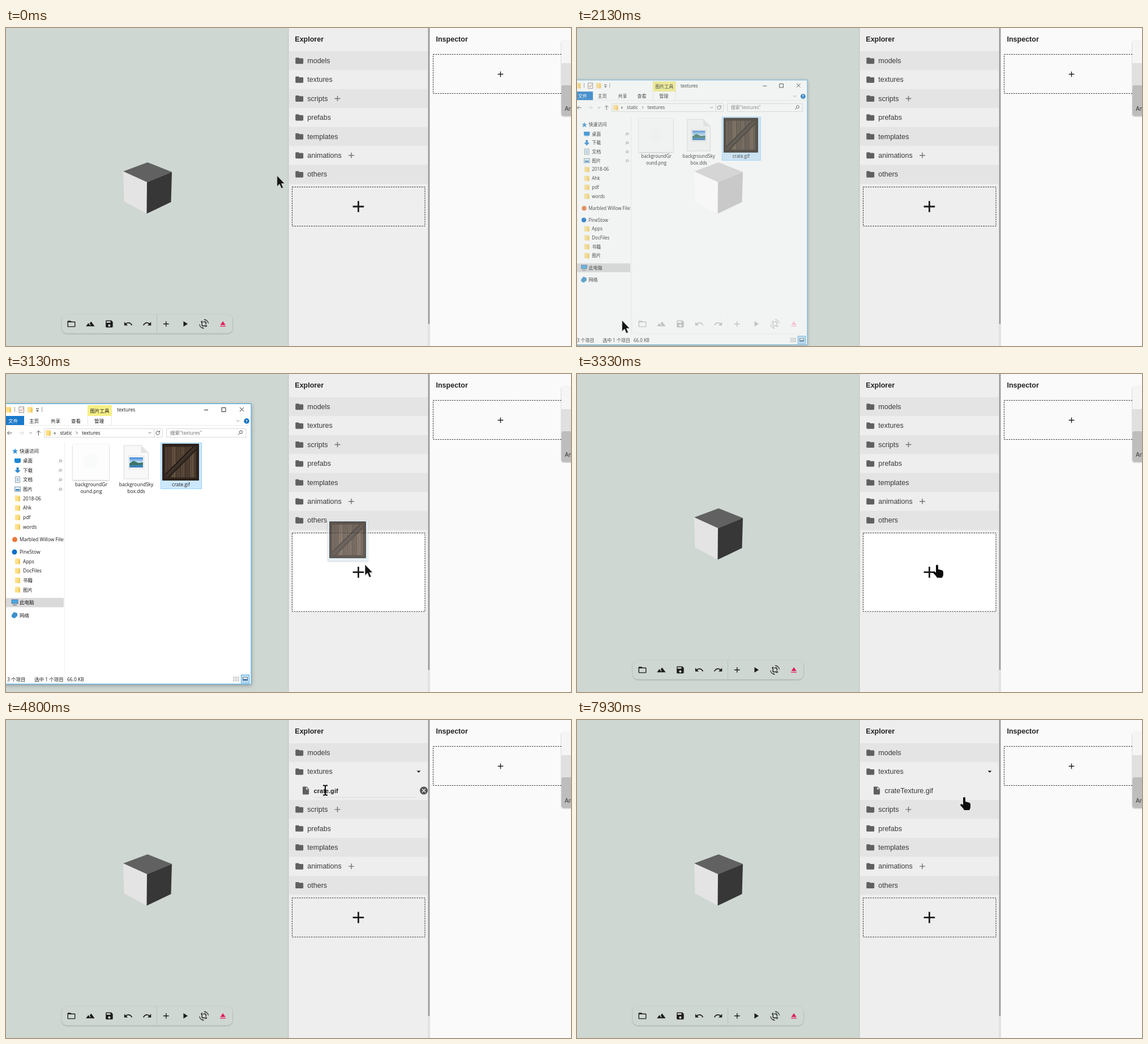
An HTML page for the animation above (8 s loop, 998x561 px).

```html
<!DOCTYPE html>
<html lang="en">
<head>
<meta charset="utf-8">
<title>Asset explorer</title>
<style>
html, body { margin: 0; width: 100%; height: 100%; overflow: hidden; background: #ced7d2; }
svg { display: block; width: 100vw; height: 100vh; }
text { white-space: pre; }
.app { font: 12.5px "Liberation Sans", Arial, sans-serif; fill: #383838; }
.bold { font-weight: bold; fill: #212121; }
.win { font: 8.5px "Open Sans", "Noto Sans CJK SC", "Noto Sans CJK", sans-serif; fill: #1a1a1a; }
.mid { text-anchor: middle; }
.dash { stroke: #303030; stroke-dasharray: 2.5 1.65; }
.thin { fill: none; stroke: #555; stroke-width: 1; }
</style>
</head>
<body>
<svg id="stage" viewBox="0 0 998 561" preserveAspectRatio="none"></svg>
<script>
const ICONS = {
  folder: 'M10 4H4c-1.1 0-2 .9-2 2v12c0 1.1.9 2 2 2h16c1.1 0 2-.9 2-2V8c0-1.1-.9-2-2-2h-8z',
  open: 'M20 6h-8l-2-2H4c-1.1 0-2 .9-2 2v12c0 1.1.9 2 2 2h16c1.1 0 2-.9 2-2V8c0-1.1-.9-2-2-2zm0 12H4V8h16z',
  terrain: 'M14 6l-3.75 5 2.85 3.8-1.6 1.2C9.8 13.75 7 10 7 10l-6 8h22z',
  save: 'M17 3H5c-1.1 0-2 .9-2 2v14c0 1.1.9 2 2 2h14c1.1 0 2-.9 2-2V7zm-5 16c-1.66 0-3-1.34-3-3s1.34-3 3-3 3 1.34 3 3-1.34 3-3 3zm3-10H5V5h10z',
  undo: 'M12.5 8c-2.65 0-5.05 1-6.9 2.6L2 7v9h9l-3.6-3.6c1.4-1.2 3.1-1.9 5.1-1.9 3.5 0 6.5 2.3 7.6 5.5l2.4-.8C21.1 11 17.1 8 12.5 8z',
  redo: 'M18.4 10.6C16.5 9 14.1 8 11.5 8c-4.6 0-8.6 3-10 7.2l2.4.8c1.1-3.2 4.1-5.5 7.6-5.5 2 0 3.7.7 5.1 1.9L13 16h9V7z',
  add: 'M19 13h-6v6h-2v-6H5v-2h6V5h2v6h6z',
  play: 'M8 5v14l11-7z',
  crop: 'M7.5 21.5C4.2 19.9 1.9 16.8 1.5 13H0c.5 6.2 5.7 11 12 11h.6l-3.8-3.8zM12 0h-.6l3.8 3.8 1.3-1.3C19.8 4.1 22.1 7.2 22.5 11H24C23.5 4.8 18.3 0 12 0zM16 14h2V8c0-1.1-.9-2-2-2h-6v2h6zm-8 2V4H6v2H4v2h2v8c0 1.1.9 2 2 2h8v2h2v-2h2v-2z',
  eject: 'M5 17h14v2H5zm7-12L5.3 15h13.4z',
  file: 'M6 2c-1.1 0-2 .9-2 2v16c0 1.1.9 2 2 2h12c1.1 0 2-.9 2-2V8l-6-6zm7 7V3.5L18.5 9z',
  cancel: 'M12 2a10 10 0 1 0 0 20 10 10 0 0 0 0-20zm5 13.6L15.6 17 12 13.4 8.4 17 7 15.6l3.6-3.6L7 8.4 8.4 7l3.6 3.6L15.6 7 17 8.4 13.4 12z',
  caret: 'M7 10l5 5 5-5z'
};
const ROW = 33.4;

const icon = (name, x, y, fill = '#606060', k = .695) =>
  `<path transform="translate(${x} ${y}) scale(${k}) translate(-12 -12)" fill="${fill}" d="${ICONS[name]}"/>`;
const rect = (x, y, w, h, fill, extra = '') =>
  `<rect x="${x}" y="${y}" width="${w}" height="${h}" fill="${fill}" ${extra}/>`;
const text = (x, y, s, cls = '', extra = '') => `<text x="${x}" y="${y}" class="${cls}" ${extra}>${s}</text>`;
const line = (d, color = '#555', extra = '') => `<path d="${d}" class="thin" style="stroke:${color}" ${extra}/>`;
const poly = (points, fill) => `<polygon points="${points}" fill="${fill}"/>`;
const dot = (x, y, r, fill) => `<circle cx="${x}" cy="${y}" r="${r}" fill="${fill}"/>`;

function row(i, name, add) {
  const top = 41 + i * ROW, mid = top + ROW / 2;
  return rect(500, top, 245, ROW, i % 2 ? '#eee' : '#e4e4e4') + icon('folder', 518.2, mid)
    + text(532.3, mid + 4.3, name) + (add ? icon('add', add, mid, '#707070') : '');
}

function scene() {
  const tools = ['open', 'terrain', 'save', 'undo', 'redo', 'add', 'play', 'crop', 'eject'];
  return rect(0, 0, 998, 561, '#ced7d2')
    + poly('250,237 293,254 249,272 207,253', '#616161')
    + poly('207,253 249,272 248.5,327.5 208.5,306', '#e4e4e4')
    + poly('293,254 249,272 248.5,327.5 291.5,307', '#373737')
    + rect(98.5, 505.5, 301.5, 33, '#cfd7d3', 'rx="9" filter="url(#soft)"')
    + line('M266.5 505V539', '#bac2be')
    + tools.map((n, i) => icon(n, 115.5 + i * 33.45, 522, n === 'eject' ? '#e01f5a' : '#1c1c1c')).join('');
}

function panels() {
  return '<g class="app">' + rect(499.5, -5, 246, 571, '#eee', 'filter="url(#soft)"')
    + text(510.3, 24.3, 'Explorer', 'bold') + row(0, 'models') + row(1, 'textures')
    + `<g id="file">${icon('caret', 729, 91, '#212121')}
      <g id="entry">${icon('file', 529.5, 124.5)}<text id="name" x="543.5" y="128.8"></text>
      <g id="edit"><path id="rule" d="M544 136.5H722" fill="none"/>${icon('cancel', 738, 124.5, '#555')}</g></g></g>`
    + '<g id="lower">' + row(2, 'scripts', 585.5) + row(3, 'prefabs') + row(4, 'templates')
    + row(5, 'animations', 610) + row(6, 'others')
    + '<rect id="drop" class="dash" x="505.5" y="280.5" width="234.5"/><g id="plus">'
    + icon('add', 622.4, 315, '#1c1c1c', 1.4) + '</g></g>'
    + rect(745, 0, 4, 561, '#e2e2e2') + rect(745.7, 0, 2.5, 522, '#999')
    + rect(749, 0, 249, 561, '#fafafa') + text(759.5, 24.3, 'Inspector', 'bold')
    + rect(754.5, 46.5, 238.5, 69, 'none', 'class="dash"') + icon('add', 873.5, 81.5, '#1c1c1c')
    + rect(981, 22, 30, 133, '#f5f5f5', 'rx="4" filter="url(#soft)"')
    + rect(981, 62, 30, 45, '#e0e0e0') + rect(981, 101, 30, 54, '#bdbdbd', 'rx="4"')
    + text(987, 145.5, 'Animation', '', 'font-size="10"') + '</g>';
}

const folderIcon = (x, y) => rect(x, y - 5, 9, 10, '#ffe08a', 'rx=".8"') + rect(x + 6, y - 3, 3, 8, '#f3c95f');

function sidebar() {
  const pinned = ['桌面', '下载', '文档', '图片'].map((s, i) => {
    const y = 153 + i * 16.7;
    const art = [
      rect(15, y - 4, 11, 7, '#1d86d6') + rect(17, y + 3, 7, 1, '#1d86d6'),
      poly(`18.5,${y - 5} 22.5,${y - 5} 22.5,${y} 26,${y} 20.5,${y + 5} 15,${y} 18.5,${y}`, '#2a86d1'),
      rect(16.5, y - 5, 8, 10, '#fff', 'stroke="#7c95a8"') + line(`M18.5 ${y - 2}h4m-4 2h4m-4 2h4`, '#5a93c4'),
      rect(15.5, y - 4, 10, 8, '#dff0fa', 'stroke="#7c95a8"') + rect(17, y, 7, 2.5, '#2d7dbb')
    ][i];
    return art + text(30, y + 3, s) + line(`M93 ${y + 3}l2.5-2.5m-2-2l4 4m-3-3l2-2 2.5 2.5-2 2`, '#8a8a8a');
  }).join('');
  const folder = (s, y) => folderIcon(16, y) + text(30, y + 3, s);
  const recent = ['2018-06', 'Ahk', 'pdf', 'words'].map((s, i) => folder(s, 219.5 + i * 16.7)).join('');
  const cloud = ['Apps', 'DocFiles', '书籍', '图片'].map((s, i) => folder(s, 330.5 + i * 16.7)).join('');
  return '<g clip-path="url(#side)">' + rect(-8, 395, 110, 16.5, '#d9d9d9')
    + poly('16,131 17.3,134.5 21,134.7 18.2,137 19.2,141 16,138.8 12.8,141 13.8,137 11,134.7 14.7,134.5', '#3791d6')
    + text(24, 139, '快速访问') + recent + dot(15.5, 292, 4.5, '#e8783c') + text(24, 295, 'Marbled Willow Files')
    + dot(15, 314, 4.5, '#0f6fc6') + text(24, 317, 'PineStow') + cloud
    + rect(10, 398, 11, 7, '#49a9e2', 'stroke="#447"  stroke-width=".6"') + rect(12, 407, 7, 1.2, '#567')
    + text(24, 406, '此电脑') + poly('10,425 14,420 20,422 20,427 15,431 10,429', '#3d8fc9') + text(24, 428.5, '网络')
    + '</g>' + pinned + line('M103.5 120V528', '#efefef');
}

function explorerWindow() {
  const ribbon = [[41, '主页'], [79, '共享'], [115, '查看'], [156, '管理']];
  return rect(-10, 52.5, 443, 494.5, '#fff', 'stroke="#3d9edb" filter="url(#shade)"')
    + folderIcon(0, 63) + line('M15.5 58v9M63.5 58v9', '#999')
    + rect(23, 58, 8.5, 10, '#fff', 'stroke="#888"') + line('M24.5 63l2 2.5 4-5', '#d2603a') + folderIcon(38, 63)
    + line('M53 61.5h5', '#333') + poly('53,64 58,64 55.5,66.5', '#333')
    + rect(144, 55, 43, 19, '#f5ef86') + text(148.5, 67.5, '图片工具') + line('M144.5 74V90M186.5 74V90', '#e6e6e6')
    + text(196, 66, 'textures') + line('M350 63.5h7M381 59.5h7v7h-7zM413 59l7 7m0-7l-7 7', '#222')
    + rect(-9, 74, 41, 16, '#1979ca') + text(4, 85.5, '文件', '', 'style="fill:#fff"')
    + ribbon.map(([x, s]) => text(x, 85.5, s)).join('') + line('M407 81.5l2.5 2.5 2.5-2.5', '#888')
    + dot(425, 83, 4.7, '#1070c0') + text(425, 86, '?', 'mid', 'style="fill:#fff;font-weight:bold;font-size:7.5px"')
    + line('M0 90.5H433', '#ebebeb')
    + line('M10.5 104H2.5m3.5-3.5L2.5 104l3.5 3.5M57.5 108.500v-8.500m-3.500 3.500l3.500-3.500 3.500 3.500')
    + line('M23 104h8m-3.500-3.500l3.500 3.500-3.500 3.500', '#d0d0d0')
    + line('M41.500 103l2 2 2-2M251.500 102.500l2.500 2.500 2.500-2.500', '#777')
    + line('M67.500 96.500h208.500v15h-208.500zM262 97v14M283.500 96.500h140.500v15h-140.500z', '#d9d9d9')
    + folderIcon(70, 104) + text(84, 107, '«') + text(95.5, 107, 'static') + line('M124 101.500l2.200 2.300-2.200 2.300')
    + text(134, 107, 'textures') + line('M270.500 101.500a3.300 3.300 0 1 0 1 2.500m0-4v2.500h-2.500')
    + text(290, 107, '搜索"textures"', '', 'style="fill:#6d6d6d"') + dot(415, 102.5, 2.6, 'none" stroke="#444')
    + line('M413 104.5l-3 3', '#444') + sidebar()
    + rect(118, 124, 64, 63, '#fdfdfd', 'filter="url(#soft)"') + dot(150, 155, 13, '#f9fafa')
    + text(150.5, 198, 'backgroundGr', 'mid') + text(150.5, 210, 'ound.png', 'mid')
    + '<path d="M208.500 126h30l13 13v46h-43z" fill="#f8f8f8" stroke="#d8d8d8"/><path d="M238.500 126v13h13z" fill="#e5e5e5"/>'
    + rect(216.5, 145, 27, 22, '#fff', 'stroke="#ddd"') + rect(218, 147, 24, 18, 'url(#sky)')
    + poly('218,158 225,153 234,157 242,156 242,160 218,161', '#3c7468')
    + text(230, 198, 'backgroundSky', 'mid') + text(230, 210, 'box.dds', 'mid')
    + rect(273.5, 121.5, 72, 81, '#cce8ff', 'stroke="#9ad2ff"') + '<use href="#box" x="276.500" y="123.500"/>'
    + text(309, 198, 'crate.gif', 'mid')
    + text(2, 541.5, '3 个项目') + text(50, 541.5, '选中 1 个项目') + text(108, 541.5, '66.0 KB')
    + line('M401 535h3m1 0h3m1 0h3m-11 3h3m1 0h3m1 0h3m-11 3h3m1 0h3m1 0h3', '#888')
    + rect(415.5, 531, 14, 14, '#cce8ff', 'stroke="#3d9edb"') + rect(418.5, 535, 8, 6, '#fff', 'stroke="#567"')
    + rect(419, 538, 7, 2.500, '#3a7ab0');
}

function crateArt() {
  const tones = ['#59493a', '#4c3d30', '#63503f', '#524234'];
  const planks = Array.from({ length: 8 }, (_, i) =>
    rect(i * 8, 0, 7.4, 64, tones[i % 4]) + line(`M${i * 8 + 3} 5v54`, '#43352a', 'opacity=".6"')).join('');
  return rect(0, 0, 64, 64, '#241b15') + planks
    + '<path d="M4 60L60 4" stroke="#1d1612" stroke-width="9"/><path d="M4 60L60 4" stroke="#3d3128" stroke-width="6"/>'
    + rect(2.5, 2.5, 59, 59, 'none', 'stroke="#30251d" stroke-width="5"')
    + rect(.5, .5, 63, 63, 'none', 'stroke="#17110d"');
}

const stage = document.getElementById('stage');
stage.innerHTML = `<defs>
  <filter id="soft" x="-10%" y="-20%" width="120%" height="140%"><feDropShadow dx="0" dy=".8" stdDeviation="1.2" flood-opacity=".3"/></filter>
  <filter id="shade"><feDropShadow dx="0" dy="2" stdDeviation="3.500" flood-opacity=".3"/></filter>
  <linearGradient id="sky" x2="0" y2="1"><stop stop-color="#3c85d8"/><stop offset=".5" stop-color="#cfe6f5"/><stop offset=".7" stop-color="#3a8ca8"/><stop offset="1" stop-color="#3f79c4"/></linearGradient>
  <clipPath id="side"><path d="M-10 110H102V530H-10z"/></clipPath>
  <g id="box">${crateArt()}</g>
</defs>
${scene()}${panels()}
<g id="tip" class="win">${rect(0, 551, 50.5, 10, '#6c6f6d')}${text(3, 566, 'textures', '', 'style="fill:#fff"')}</g>
<g id="window" class="win">${explorerWindow()}</g>
<g id="ghost" opacity=".75">${rect(-66, -77.5, 72, 71.500, '#dcecf4', 'filter="url(#soft)"')}<use href="#box" x="-62.500" y="-75.500"/></g>
<g id="cursor">
  <path id="arrow" d="M0 0V19.500L4.500 15.300 7.700 22.800 11 21.400 7.900 14.200H13.600z" fill="#161616" stroke="#eee" stroke-width=".7"/>
  <path id="hand" d="M-2.500 2q0-2 2-2t2 2V8l6 1.500q3 .8 3 4v4q0 2-2 5.500H-.5q-1.500-3.500-6-7.500-1.700-2 0-3 2-.8 4 1.500z" fill="#0c0c0c"/>
  <path id="beam" d="M-4-8.500h2.500L0-7.500l1.500-1H4M-4 8.500h2.500L0 7.500l1.500 1H4M0-7.500v15" fill="none" stroke="#0c0c0c" stroke-width="2"/>
</g>`;

const el = id => document.getElementById(id);
const show = (id, on) => { el(id).style.display = on ? '' : 'none'; };
const at = (id, x, y) => el(id).setAttribute('transform', `translate(${x} ${y})`);

// time, x, y, pointer shape until the next step
const POINTER = [
  [0, 479, 260, 'arrow'], [533, 145, 531, 'arrow'], [590, 145, 531, ''],
  [1930, 25, 558, 'arrow'], [2133, 78, 518, 'arrow'], [2266, 312, 152, 'arrow'], [2333, 315, 157, 'arrow'],
  [2600, 362, 210, 'arrow'], [2800, 446, 298, 'arrow'], [3133, 634, 336, 'arrow'], [3190, 636.5, 336.5, 'hand'],
  [3400, 636.5, 336.5, 'hand'], [3640, 592, 92, 'hand'], [3790, 588, 90, 'hand'], [4000, 562, 128, 'hand'],
  [4130, 562, 122, 'hand'], [4460, 562, 123, 'hand'], [4533, 564, 123, 'hand'], [4790, 564, 124, 'beam'],
  [4870, 564, 124, 'beam'], [5200, 652, 130, 'hand'], [5400, 684.5, 138, 'hand'], [5590, 684.5, 138, ''],
  [7930, 684.5, 136, 'hand'], [8000, 684.5, 136, 'hand']
];
// time, origin-based scale, opacity
const RESTORE = [[1995, .84, 0], [2133, .944, .73], [2266, 1, 1], [8000, 1, 1]];
const NAMES = [[0, ''], [6000, 'T'], [6200, 'Te'], [6530, 'Tex'], [6930, 'Text'], [7000, 'Textu'], [7130, 'Textur'], [7200, 'Texture']];

function sample(keys, t) {
  const i = Math.max(0, keys.findIndex(k => k[0] > t) - 1);
  const a = keys[i], b = keys[i + 1];
  const p = Math.max(0, (t - a[0]) / (b[0] - a[0]));
  return a.map((v, j) => typeof v === 'number' ? v + (b[j] - v) * p : v);
}

function draw(now) {
  const t = Math.floor((now % 8000) * .015 + .07) / .015 % 8000 + .5;
  const between = (a, b) => t >= a && t < b;

  const [, x, y, shape] = sample(POINTER, t);
  at('cursor', x, y);
  for (const id of ['arrow', 'hand', 'beam']) show(id, id === shape);

  show('tip', between(1460, 1995));
  show('window', between(1995, 3195));
  const [, scale, opacity] = sample(RESTORE, t);
  el('window').setAttribute('transform', `translate(-37 759) scale(${scale}) translate(37 -759)`);
  el('window').setAttribute('opacity', opacity);
  show('ghost', between(2590, 3190));
  at('ghost', x, y);

  const hover = between(2925, 3460), opened = t >= 3720, editing = between(4790, 7595);
  el('drop').setAttribute('height', hover ? 138.5 : 69);
  el('drop').setAttribute('fill', hover ? '#fff' : '#eee');
  at('plus', 0, hover ? 34.7 : 0);
  at('lower', 0, opened ? ROW : 0);
  show('file', t >= 3460);
  show('entry', opened);
  show('edit', editing);

  const typed = NAMES.filter(k => t >= k[0] - 4).pop()[1];
  const name = el('name');
  name.textContent = `crate${typed}.gif`;
  name.setAttribute('class', editing ? 'bold' : '');
  name.style.fontSize = editing ? '11.1px' : '';
  el('rule').setAttribute('stroke', t >= 5660 ? '#bdbdbd' : '#dadada');
}

const start = performance.now();
function tick() {
  draw(performance.now() - start);
  requestAnimationFrame(tick);
}
tick();
</script>
</body>
</html>
```
